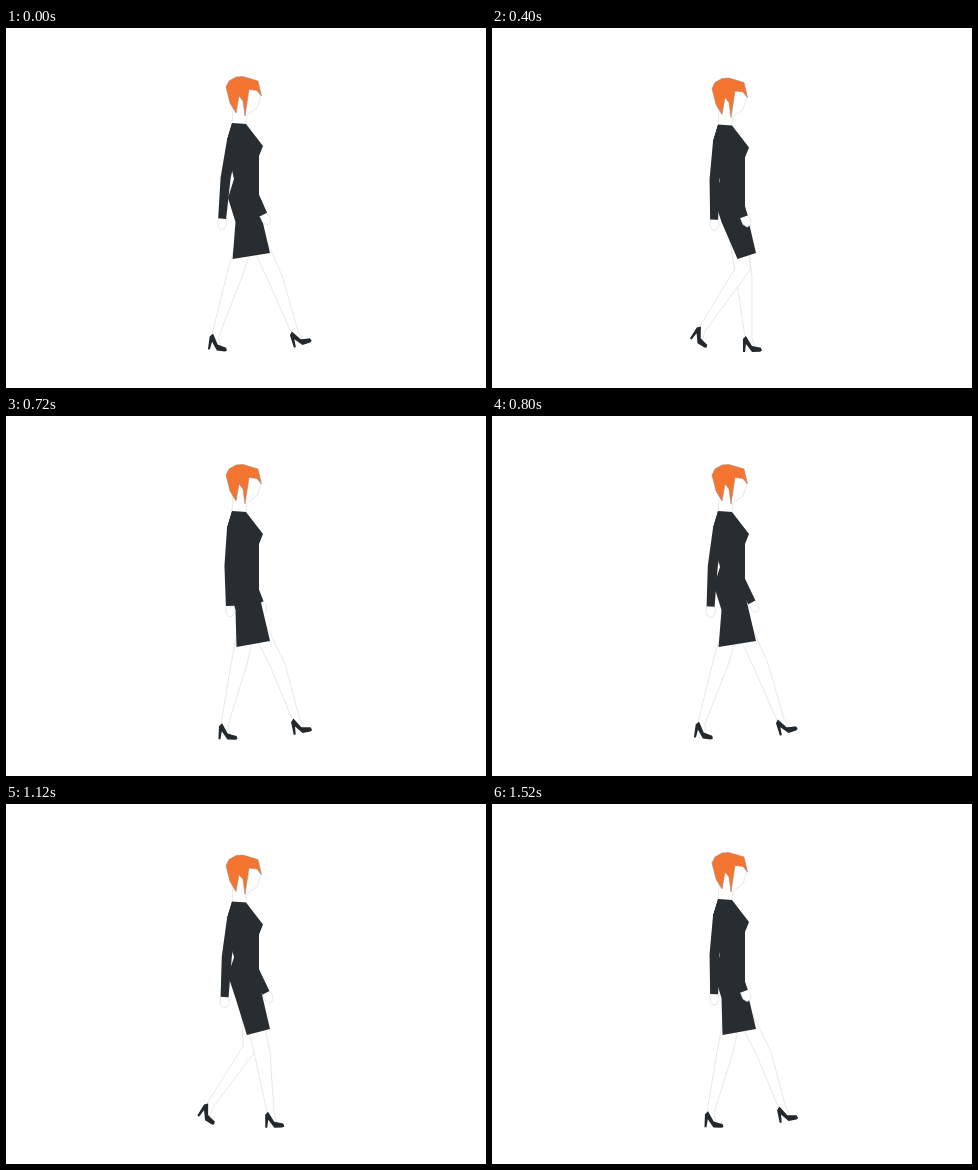
Recreate the animation shown at these times as an HTML page with a canvas. Size 480 px wide and 360 px high, loop 1.6 s.

```html
<!DOCTYPE html>
<html lang="en">
<head>
<meta charset="utf-8">
<title>Walk cycle</title>
<style>
  html, body { margin: 0; width: 100%; height: 100%; overflow: hidden; background: #fff; }
  canvas { display: block; }
</style>
</head>
<body>
<canvas id="stage" width="480" height="360"></canvas>
<script>
const ctx = document.getElementById('stage').getContext('2d');
const LOOP = 1600, TICK = 80;
const DRESS = '#272d31', SHOE = '#23282d', HAIR = '#f47530', SKIN = '#fff', EDGE = '#d6d8da';
const HIP_X = 243, FRONT_X = 287;

function shape(points, fill, edge) {
  ctx.beginPath();
  points.forEach(([x, y]) => ctx.lineTo(x, y));
  ctx.closePath();
  ctx.fillStyle = fill;
  ctx.fill();
  if (edge) {
    ctx.strokeStyle = edge;
    ctx.lineWidth = 0.6;
    ctx.stroke();
  }
}

// Maps local points to the stage: rotated by angle, then moved to x, y
function placer(x, y, angle) {
  const c = Math.cos(angle), s = Math.sin(angle);
  return (px, py) => [x + px * c - py * s, y + px * s + py * c];
}

// The shoe slides back on the ground: heel strike first, heel lift last
function stance(u) {
  const strike = (1 - u) ** 6, lift = u ** 12;
  return {
    x: FRONT_X - 86 * u + 6 * Math.sin(Math.PI * u),
    y: 324 - 4 * strike - 3 * lift,
    degrees: 8 * lift - 18 * strike,
    kick: 0
  };
}

// The shoe trails, rises and accelerates forward
function swing(u) {
  const kick = Math.sin(Math.PI * u) ** 2;
  return {
    x: Math.min(FRONT_X, 188.5 + (u - 0.3) ** 2 * (138 + 150 * u)),
    y: 321 - u - 10.5 * kick,
    degrees: 8 - 26 * u + 37 * kick,
    kick
  };
}

function legPose(cycle) {
  const u = cycle * 2 % 2;
  const { x, y, degrees, kick } = u < 1 ? stance(u) : swing(u - 1);
  const at = placer(x, y, degrees * Math.PI / 180);
  const [ankleX] = at(7, -14);
  return { at, kneeX: (HIP_X + ankleX) / 2 + 2 + 22 * kick, kneeY: 248 - 7 * kick };
}

function leg({ at, kneeX, kneeY }) {
  shape([[HIP_X - 8, 195], [kneeX - 8, kneeY], at(3, -15), at(5, -8), at(13, -4), at(10, -14),
    [kneeX + 8, kneeY], [HIP_X + 10, 195]], SKIN, EDGE);
  shape([at(1, -13), at(4, -16), at(10, -6), at(14, -5), at(19, -4), at(20, -1), at(18, 0),
    at(10, 0), at(4, -8), at(3, 0), at(1, 0)], SHOE);
}

function arm(cycle, reach, drop) {
  const sway = reach * Math.cos(2 * Math.PI * (cycle - 0.1));
  const wristX = 238 + sway, wristY = 188.5 - 0.1 * sway + drop;
  const elbowX = 230.5 + sway / 2, elbowY = 150 + drop;
  const angle = -Math.atan2(wristX - elbowX, wristY - elbowY);
  const hand = placer(wristX, wristY, angle), elbow = placer(elbowX, elbowY, angle);
  shape([hand(-4, 0), hand(4, 0), hand(5, 5), hand(3, 10), hand(-1, 11), hand(-4, 7)], SKIN, EDGE);
  shape([[226, 96 + drop], [221, 112 + drop], elbow(-5, 0), hand(-4, 0), hand(4, 0),
    elbow(5, 0), [233, 112 + drop]], DRESS);
}

function head(drop) {
  const lower = points => points.map(([x, y]) => [x, y + drop]);
  shape(lower([[227, 80], [226, 96], [240, 96], [241, 87], [251, 80], [255, 68], [250, 60], [232, 60]]), SKIN, EDGE);
  shape(lower([[220, 59], [223, 53], [230, 49], [237, 48.5], [252, 53], [255.5, 68], [251, 62.5],
    [243, 61.5], [239, 88], [237, 73], [233, 68], [230, 85], [224, 75]]), HAIR, '#a8897b');
}

function dress(drop, hemBack) {
  shape([[226, 95 + drop], [240, 96 + drop], [257, 118 + drop], [253, 128 + drop], [253, 178],
    [264, 225], [hemBack, 231], [229.5, 194], [222, 170 + drop / 2], [228, 151 + drop],
    [225, 138 + drop], [221, 112 + drop]], DRESS);
}

function draw(cycle) {
  const drop = 3 * Math.max(0, Math.sin(Math.PI * (cycle * 2 % 1) / 0.6));
  const farLeg = legPose(cycle), nearLeg = legPose(cycle + 0.5);
  const rearKnee = Math.min(farLeg.kneeX, nearLeg.kneeX);
  ctx.fillStyle = '#fff';
  ctx.fillRect(0, 0, 480, 360);
  arm(cycle + 0.5, 27, drop);
  leg(farLeg);
  leg(nearLeg);
  head(drop);
  dress(drop, HIP_X - 4 + 0.85 * (rearKnee - HIP_X));
  arm(cycle, 24, drop);
}

const start = performance.now();
function tick() {
  const time = (performance.now() - start) % LOOP;
  draw(Math.floor(time / TICK) * TICK / LOOP);
  requestAnimationFrame(tick);
}
tick();
</script>
</body>
</html>
```
